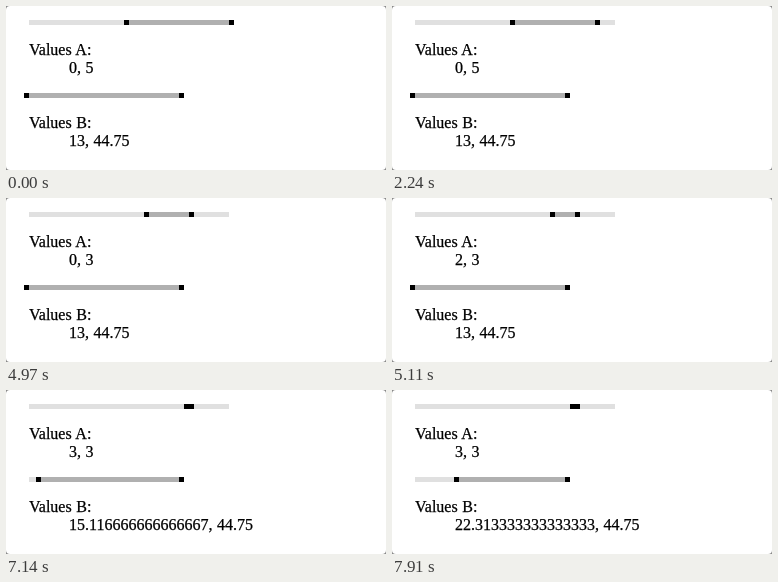
These frames come from a looping animation (380 by 164 pixels, 8 s). An HTML page:

```html
<!DOCTYPE html>
<html lang="en">
<head>
<meta charset="utf-8">
<title>Range sliders</title>
<style>
html, body { margin: 0; width: 100%; height: 100%; overflow: hidden; background: #888; }
svg { display: block; width: 380px; height: 164px; background: #fff; border-radius: 4px; }
text {
  font: 16px "Liberation Serif", "Times New Roman", serif;
  word-spacing: .6px;
  stroke: #000;
  stroke-width: .25px;
}
.track { fill: #e0e0e0; }
.range { fill: #b0b0b0; }
</style>
</head>
<body>
<svg id="stage" viewBox="0 0 380 164"></svg>
<script>
const LOOP = 8000, STEP = 70, LEFT = 23, SIZE = 5;
const stage = document.getElementById('stage');

function add(tag, attrs, text = '') {
  const el = document.createElementNS('http://www.w3.org/2000/svg', tag);
  for (const key in attrs) el.setAttribute(key, attrs[key]);
  el.textContent = text;
  stage.append(el);
  return el;
}

// Returns a function that takes both handle offsets in pixels and the printed values
function slider(name, y, length) {
  const bar = (cls, width) => add('rect', { class: cls, x: LEFT, y, width, height: SIZE });
  bar('track', length);
  const range = bar('range', 0), low = bar('', SIZE), high = bar('', SIZE);
  add('text', { x: LEFT, y: y + 35 }, `Values ${name}:`);
  const label = add('text', { x: LEFT + 40, y: y + 53 });
  return (lo, hi, values) => {
    range.setAttribute('x', LEFT + lo);
    range.setAttribute('width', hi - lo);
    low.setAttribute('x', LEFT + lo - SIZE);
    high.setAttribute('x', LEFT + hi);
    label.textContent = values.join(', ');
  };
}

const showA = slider('A', 14, 200), showB = slider('B', 87, 150);

const passed = (times, t) => times.filter(time => time <= t).length;

// Slider A runs from -5 to 5 and snaps to whole numbers
const valuesA = t => [passed([4970, 5040, 5320], t), 5 - passed([2240, 3080], t)];
const offsetA = value => (value + 5) * 20;

// Slider B runs from 13 to 44.75; its printed value trails the dragged handle
const movesB = [7140, 7210, 7350, 7420, 7630];
const handleB = [0, 12, 23, 37, 44, 44];
const printedB = [0, 10, 22, 32, 42, 44];
const valueB = offset => 13 + offset * 31.75 / 150;

function draw(t) {
  showA(...valuesA(t).map(offsetA), valuesA(t - STEP));
  const move = passed(movesB, t);
  showB(handleB[move], 150, [valueB(printedB[move]), 44.75]);
}

const start = performance.now();
function tick(now) {
  draw(Math.max(0, now - start) % LOOP);
  requestAnimationFrame(tick);
}
draw(0);
requestAnimationFrame(tick);
</script>
</body>
</html>
```
